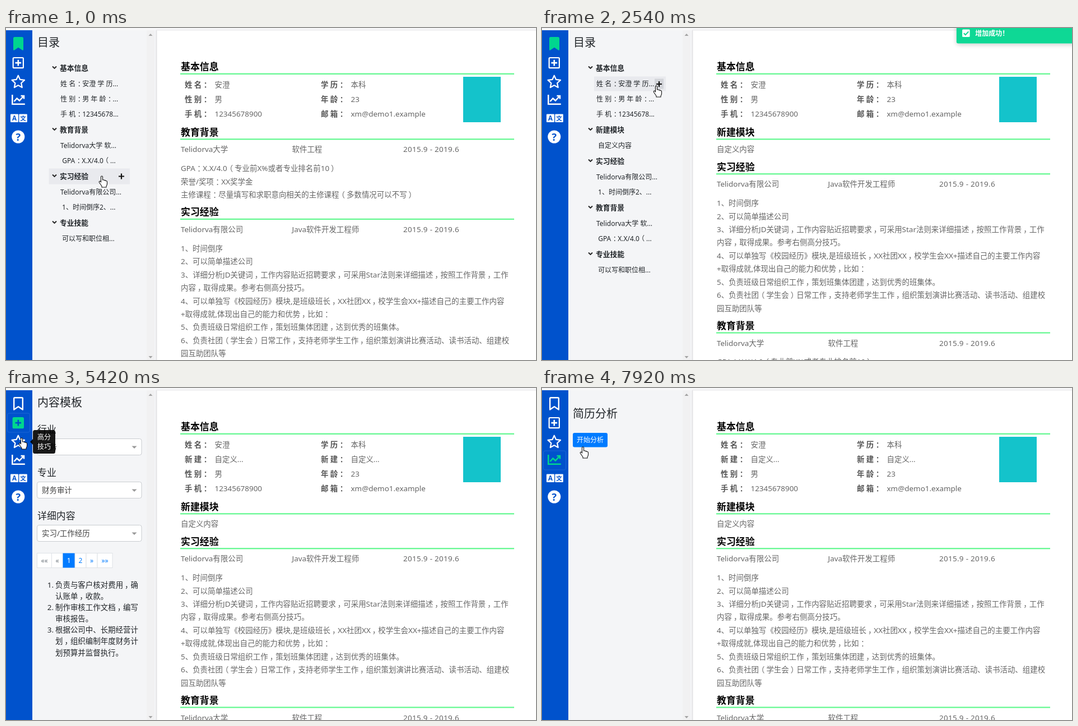
Animation, 946 px wide and 592 px high, one loop 7990 ms. Source, as an HTML page:

```html
<!DOCTYPE html>
<html lang="zh-CN">
<head>
<meta charset="utf-8">
<title>简历编辑</title>
<style>
html, body { margin: 0; width: 100%; height: 100%; overflow: hidden; background: #fff; }
svg { display: block; width: 946px; height: 592px; }
text { font-family: "Noto Sans", "Noto Sans CJK SC", "Noto Sans CJK", sans-serif; white-space: pre; }
</style>
</head>
<body>
<svg viewBox="0 0 946 592" xmlns="http://www.w3.org/2000/svg">
  <defs>
    <filter id="shade" x="-20%" y="-60%" width="140%" height="220%">
      <feDropShadow dx="0" dy="2" stdDeviation="4" flood-color="#000" flood-opacity=".22"/>
    </filter>
  </defs>
  <rect width="946" height="592" fill="#fff"/>
  <g id="page"></g>
  <rect x="47" y="4" width="221" height="588" fill="#f4f5f7"/>
  <rect x="251" y="4" width="14" height="588" fill="#f1f1f2"/>
  <path d="M254.500 14l3.500-4 3.500 4zM254.500 585l3.500 4 3.500-4z" fill="#a3a3a3"/>
  <rect x="267.500" y="4" width="2" height="588" fill="#e3e4e6"/>
  <g id="panel"></g>
  <rect width="946" height="4" fill="#f8f8f9"/>
  <rect x="268" y="3" width="678" height="1.500" fill="#ececee"/>
  <rect y="4" width="47" height="588" fill="#0052cc"/>
  <g id="icons"></g>
  <g id="tip"></g>
  <g id="toasts"></g>
  <path id="hand" fill="#fff" stroke="#111" stroke-width="1.100" stroke-linejoin="round"
    d="M-1.500 11V1.500a1.500 1.500 0 0 1 3 0V7q2.500-.8 3 .8q2.200-.6 2.700.8q2.300-.3 2.300 1.800v3.600q0 2-1.500 4v2h-8v-2l-4.500-6.500q-.8-1.600.6-2.200t2.400 1.500z"/>
</svg>
<script>
const LOOP = 7990, DARK = '#212529', GREEN = '#00d68f', BLUE = '#0052cc';
const BODY = 13.45;
const NUDGE = { '，': 3, '：': 3.5, '）': 3, '（': -3 };
const $ = id => document.getElementById(id);
const clamp = v => Math.max(0, Math.min(1, v));

// Full-width punctuation is nudged to the middle of its cell.
function shifts(s) {
  let last = 0;
  return [...s].map(c => {
    const now = NUDGE[c] || 0, d = now - last;
    last = now;
    return d;
  }).join(' ');
}

// Text whose glyphs are centred on cy; "head" is an optional bold start.
function text(x, cy, s, size = BODY, fill = DARK, extra = '', head = '') {
  const all = head + s;
  const dx = /[，：（）]/.test(all) && !extra.includes('spacing') ? `dx="${shifts(all)}"` : '';
  const bold = head && `<tspan font-weight="700">${head}</tspan>`;
  return `<text x="${x}" y="${cy + size * .37}" font-size="${size}" fill="${fill}" ${dx} ${extra}>${bold}${s}</text>`;
}
const BOLD = 'font-weight="700"';
const rect = (x, y, w, h, fill, extra = '') =>
  `<rect x="${x}" y="${y}" width="${w}" height="${h}" fill="${fill}" ${extra}/>`;
const path = (d, extra) => `<path d="${d}" ${extra}/>`;

const cache = {};
function put(id, html) {
  if (cache[id] !== html) $(id).innerHTML = cache[id] = html;
}

const SECTIONS = {
  info: {
    name: '基本信息',
    rows: [['姓名', '安澄', '学历', '本科'], ['性别', '男', '年龄', '23'],
      ['手机', '12345678900', '邮箱', 'xm@demo1.example']],
    side: ['姓 名：安澄 学 历...', '性 别：男 年 龄：...', '手 机：12345678...']
  },
  edu: {
    name: '教育背景',
    sub: ['Telidorva大学', '软件工程', '2015.9 - 2019.6'],
    lines: ['GPA：X.X/4.0（专业前X%或者专业排名前10）', '荣誉/奖项：XX奖学金',
      '主修课程：尽量填写和求职意向相关的主修课程（多数情况可以不写）'],
    side: ['Telidorva大学 软...', ' GPA：X.X/4.0（...']
  },
  job: {
    name: '实习经验',
    sub: ['Telidorva有限公司', 'Java软件开发工程师', '2015.9 - 2019.6'],
    lines: ['1、时间倒序', '2、可以简单描述公司',
      '3、详细分析JD关键词，工作内容贴近招聘要求，可采用Star法则来详细描述，按照工作背景，工作',
      '内容，取得成果。参考右侧高分技巧。',
      '4、可以单独写《校园经历》模块,是班级班长，XX社团XX，校学生会XX+描述自己的主要工作内容',
      '+取得成就,体现出自己的能力和优势，比如：',
      '5、负责班级日常组织工作，策划班集体团建，达到优秀的班集体。',
      '6、负责社团（学生会）日常工作，支持老师学生工作，组织策划演讲比赛活动、读书活动、组建校',
      '园互助团队等'],
    side: ['Telidorva有限公司...', ' 1、时间倒序2、...']
  },
  mod: { name: '新建模块', lines: ['自定义内容'], side: [' 自定义内容'] },
  skill: { name: '专业技能', lines: [], side: [' 可以写和职位相...'] }
};
const NEW_ROW = ['新建', '自定义...', '新建', '自定义...'];
const NEW_SIDE = '新 建：自定义... ...';
const withNew = (list, item, on) => on ? [list[0], item, ...list.slice(1)] : list;

const ADD_MODULE = 2120, ADD_ROW = 2960;
function order(t, swapAt) {
  const pair = t < swapAt ? ['edu', 'job'] : ['job', 'edu'];
  return ['info', ...(t < ADD_MODULE ? [] : ['mod']), ...pair, 'skill'];
}

function page(t) {
  const gray = '#666', pitch = 23.45;
  let y = 69, out = rect(816, 87, 67, 81, '#14c3cb');
  for (const key of order(t, 1060)) {
    const s = SECTIONS[key];
    out += text(312, y, s.name, 16.9, '#000', BOLD) + rect(311, y + 11.7, 596, 2.2, '#62f88f');
    if (s.rows) {
      const rows = withNew(s.rows, NEW_ROW, t >= ADD_ROW);
      rows.forEach((r, i) => {
        const cy = y + 32.5 + 26 * i;
        [[319, 372.5], [562, 615.5]].forEach(([a, b], k) => {
          out += text(a, cy, r[2 * k] + '：', BODY, '#555', BOLD + ' letter-spacing="3.4"')
            + text(b, cy, r[2 * k + 1], BODY, gray);
        });
      });
      y += 38.5 + 26 * rows.length;
    } else {
      const top = s.sub ? 64.7 : 31;
      if (s.sub) s.sub.forEach((v, i) => {
        out += text(312 + 198.5 * i, y + 31, v, BODY, gray, i == 2 ? 'letter-spacing=".3"' : '');
      });
      s.lines.forEach((l, i) => out += text(312, y + top + pitch * i, l, BODY, gray));
      y += top + pitch * s.lines.length + 7.5;
    }
  }
  return out;
}

const plus = (x, y) => path(`M${x - 5} ${y}h10M${x} ${y - 5}v10`, 'stroke="#111" stroke-width="2.2"');

function outline(t, [cx, cy]) {
  let y = 71.5, out = text(56, 26, '目录', 20);
  const over = (x, c, h) => cx >= x && cx <= 221 && Math.abs(cy - c) < h;
  for (const key of order(t, 620)) {
    const s = SECTIONS[key];
    if (over(77, y, 14)) out += rect(76.5, y - 14, 144.5, 28, '#e9eaee') + plus(206, y);
    out += path(`M83 ${y - 3}l3.500 3.500 3.500-3.500`, 'fill="none" stroke="#222" stroke-width="1.900"')
      + text(96, y, s.name, 12.75, DARK, BOLD);
    const items = withNew(s.side, NEW_SIDE, key == 'info' && t >= ADD_ROW);
    items.forEach((v, i) => {
      const c = y + 28 + 27 * i;
      if (over(93, c, 13)) {
        out += rect(93, c - 13, 128, 26, '#e9eaee');
        if (cx > 200 && cx < 218) out += rect(201, c - 9, 16, 18, '#d3d5da');
        out += plus(209, c + .5);
      }
      out += text(97, c, v, 12);
    });
    y += 29 + 27 * items.length;
  }
  return out;
}

const select = (y, s) => rect(55.5, y + .5, 186.500, 29, '#fff', 'rx="3.5" stroke="#c9ccd0"')
  + text(64, y + 15, s, BODY, '#444')
  + path(`M224.500 ${y + 13.5}h9l-4.500 4.500z`, 'fill="#999"');

function templates() {
  let out = text(56, 26, '内容模板', 20);
  [['行业', '财务'], ['专业', '财务审计'], ['详细内容', '实习/工作经历']].forEach(([a, b], i) => {
    out += text(56, 74 + 77 * i, a, 16.9) + select(90 + 77 * i, b);
  });
  const edges = [55.5, 81.5, 101.5, 123, 143, 163, 190];
  ['««', '«', '1', '2', '»', '»»'].forEach((s, i) => {
    const x = edges[i], w = edges[i + 1] - x, on = i == 2;
    out += rect(x, 294.5, w, 26, on ? '#007bff' : '#fff', on ? '' : 'stroke="#dee2e6"')
      + text(x + w / 2, 307.5, s, 12, on ? '#fff' : i < 2 ? '#6c757d' : '#007bff', 'text-anchor="middle"');
  });
  ['负责与客户核对费用，确', '认账单，收款。', '制作审核工作文档，编写', '审核报告。',
    '根据公司中、长期经营计', '划，组织编制年度财务计', '划预算并监督执行。'].forEach((s, i) => {
    const y = 351 + 20.1 * i;
    if (i < 5 && i % 2 == 0) out += text(85, y, i / 2 + 1 + '.', BODY, DARK, 'text-anchor="end"');
    out += text(88, y, s);
  });
  return out;
}

function advice() {
  const lines = [['1、必填项：', '姓名，性别，年龄'], ['', '（生日），电话，邮箱（注意'], ['', '邮箱名字)。'],
    ['2、选填：', '照片可以放个帅气、'], ['', '秀气、整洁的寸照。政治面貌'], ['', '看要求，一般国企和事业单位'],
    ['', '党员有优势。'], ['3、不填：', '身高、体重、籍贯、'], ['', '民族等没用的信息。']];
  return text(55, 26, '高分技巧', 20) + select(63, '基本信息')
    + lines.map(([a, b], i) => text(55.5, 124 + 20.1 * i, b, BODY, DARK, '', a)).join('');
}

const analysis = () => text(55, 46, '简历分析', 20) + rect(55, 80, 62, 25.5, '#007bff', 'rx="3"')
  + text(86, 93, '开始分析', 12, '#fff', 'font-weight="500" text-anchor="middle"');

function star(cx, cy, r) {
  return 'M' + Array.from({ length: 10 }, (_, i) => {
    const a = Math.PI * (i / 5 - .5), d = i % 2 ? r * .48 : r;
    return (cx + d * Math.cos(a)).toFixed(2) + ' ' + (cy + d * Math.sin(a)).toFixed(2);
  }).join('L') + 'z';
}

function icons(active) {
  const look = (i, w) => `fill="${active == i ? GREEN : 'none'}" stroke="${active == i ? GREEN : '#fff'}" stroke-width="${w}" stroke-linejoin="round"`;
  const mid = [28, 62, 95, 129][active];
  const ring = active ? rect(2.5, mid - 17, 40, 34, 'none', 'rx="3" stroke="#1c66d6"') : '';
  const line = active == 3 ? GREEN : '#fff';
  return ring
    + path('M14.200 18.500q0-1.300 1.300-1.300h13q1.300 0 1.300 1.300v20l-7.800-5.200-7.800 5.200z', look(0, 2.4))
    + rect(12.7, 53, 18.2, 18.2, active == 1 ? GREEN : 'none', `rx="1.500" stroke="${active == 1 ? GREEN : '#fff'}" stroke-width="2.2"`)
    + path('M16.500 62.100h10.600M21.800 56.800v10.600', `stroke="${active == 1 ? BLUE : '#fff'}" stroke-width="2.600"`)
    + path(star(21.8, 96.5, 11.8), look(2, 2.2))
    + path('M11.300 119v16.800h22.500M14.500 131l5-5.500 4.500 4 7.500-8M26.500 121h5.500v5.500', `fill="none" stroke="${line}" stroke-width="2.500"`)
    + rect(8, 153.5, 14, 14.5, '#fff', 'rx="1"') + rect(23.3, 153.5, 14.5, 14.5, '#fff', 'rx="1"')
    + text(15, 161, 'A', 11.5, BLUE, BOLD + ' text-anchor="middle"')
    + text(30.5, 160.8, '文', 10.5, BLUE, BOLD + ' text-anchor="middle"')
    + '<circle cx="21.800" cy="194" r="11.500" fill="#fff"/>'
    + text(21.8, 194, '?', 18, BLUE, 'font-weight="800" text-anchor="middle"');
}

const TIPS = [[4420, 5060, 62, '内容', '模板'], [5330, 5990, 96, '高分', '技巧'], [6880, 7350, 128, '简历', '分析']];
function tip(t) {
  return TIPS.map(([from, to, y, a, b]) => {
    const o = Math.min(clamp((t - from) / 80), clamp((to - t) / 80));
    return o && `<g opacity="${o.toFixed(2)}">${rect(48, y - 21, 40, 42, '#000', 'rx="3.5" opacity=".9"')}`
      + path(`M48 ${y - 5}l-5 5 5 5z`, 'opacity=".9"')
      + text(56, y - 8.5, a, 12, '#fff') + text(56, y + 9, b, 12, '#fff') + '</g>';
  }).filter(Boolean).join('');
}

const TOASTS = [2156, 3000];
function toasts(t) {
  return TOASTS.map((start, i) => {
    const inn = 1 - (1 - clamp((t - start) / 630)) ** 3;
    const out = clamp((t - start - 1010) / 464) ** 2;
    const show = inn * (1 - out);
    if (show <= 0) return '';
    const x = 731 + 150 * (1 - inn) + 150 * out;
    const y = i ? 0 : 53 * clamp((t - TOASTS[1]) / 250);
    return `<g transform="translate(${x.toFixed(2)} ${y.toFixed(2)})" opacity="${show.toFixed(3)}">`
      + rect(0, -16, 260, 43.5, GREEN, 'rx="3" filter="url(#shade)"')
      + rect(10.3, 2.5, 13.5, 13.5, '#fff', 'rx="1.500"')
      + path('M13 9.200l3 3 5.500-5.800', `fill="none" stroke="${GREEN}" stroke-width="2"`)
      + text(33.5, 9.2, '增加成功！', 12, '#fff', BOLD) + '</g>';
  }).join('');
}

// time, x and y of the pointer's fingertip
const MOVES = [[0, 171, 264], [230, 171, 264], [990, 174, 182], [1060, 174, 182], [1580, 192, 74],
  [1840, 205, 70], [2150, 205, 70], [2480, 204, 103], [4010, 204, 103], [4560, 24, 62], [5240, 24, 62],
  [5420, 28, 89], [5670, 28, 92], [6600, 28, 92], [7060, 30, 132], [7660, 30, 132], [7920, 73, 105], [LOOP, 73, 105]];
function pointer(t) {
  const i = MOVES.findIndex(m => m[0] > t);
  const [t0, x0, y0] = MOVES[i - 1], [t1, x1, y1] = MOVES[i];
  const p = (t - t0) / (t1 - t0), e = p * p * (3 - 2 * p);
  return [x0 + (x1 - x0) * e, y0 + (y1 - y0) * e];
}

const SWITCH = [0, 4700, 5930, 7130];
const PANELS = [outline, templates, advice, analysis];
function draw(t) {
  const at = pointer(t);
  const active = SWITCH.filter(s => t >= s).length - 1;
  put('page', page(t));
  put('panel', PANELS[active](t, at));
  $('panel').setAttribute('opacity', active ? clamp((t - SWITCH[active]) / 350) : 1);
  put('icons', icons(active));
  put('tip', tip(t));
  put('toasts', toasts(t));
  $('hand').setAttribute('transform', `translate(${at[0].toFixed(2)} ${at[1].toFixed(2)})`);
}

function tick() {
  draw(performance.now() % LOOP);
  requestAnimationFrame(tick);
}
tick();
</script>
</body>
</html>
```
